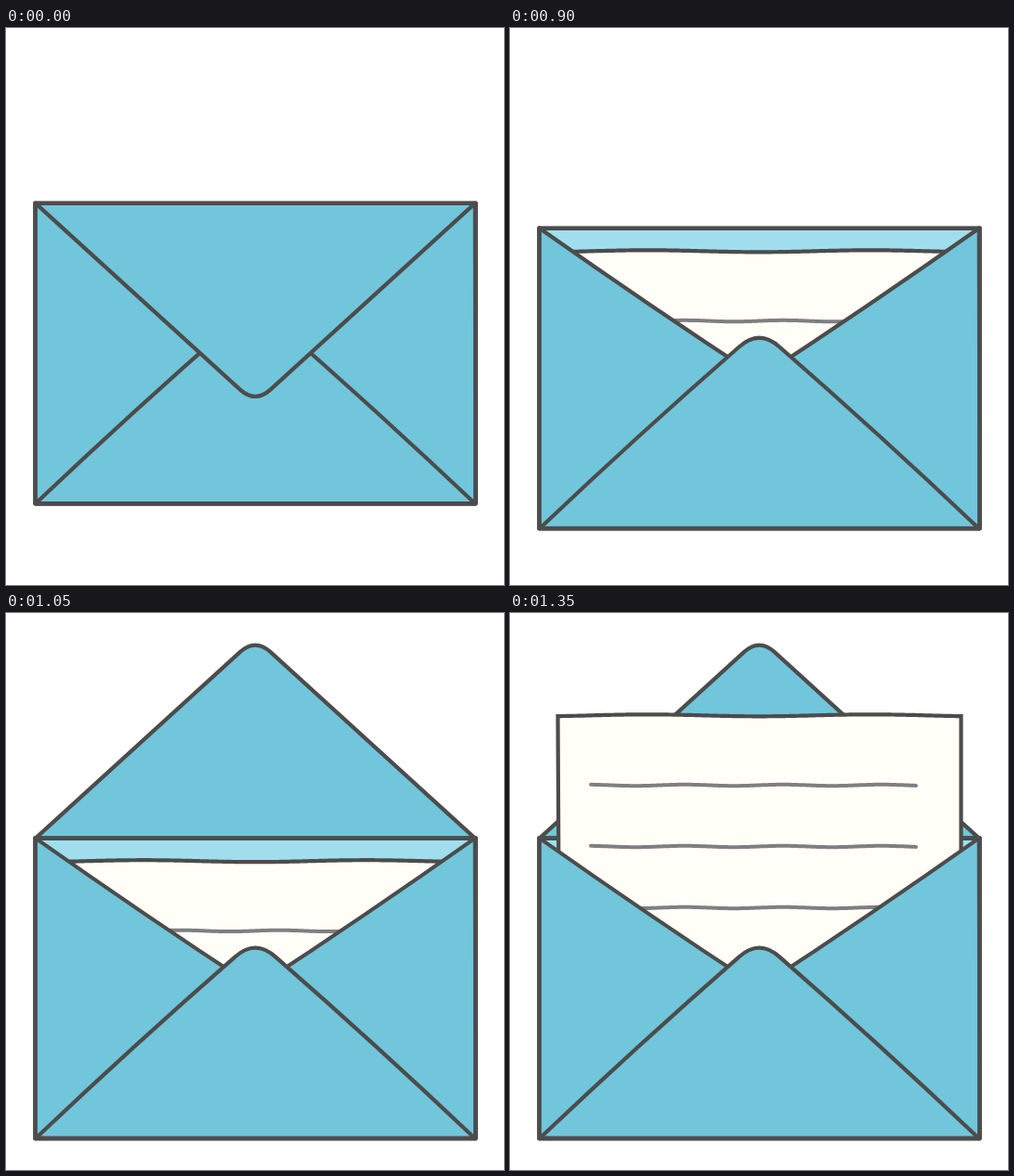
An HTML page with a canvas for the animation above (2.15 s loop, 536 px wide and 600 px high).

```html
<!DOCTYPE html>
<html lang="en">
<head>
<meta charset="utf-8">
<title>Opening envelope</title>
<style>
  html, body { margin: 0; width: 100%; height: 100%; overflow: hidden; background: #fff; }
  canvas { display: block; }
</style>
</head>
<body>
<canvas width="536" height="600"></canvas>
<script>
const ctx = document.querySelector('canvas').getContext('2d');

const BLUE = '#71c6db', INSIDE = '#a0deee', PAPER = '#fffff8';
const INK = '#4c4c4c', GRAY = '#7f7f81';
const LEFT = 31.5, RIGHT = 505.5, MID = 268.3, HALF = 236.5, HEIGHT = 323.4;
const LOOP = 2150, HOLD = 800, STEP = 50, STEPS = 12, OPEN = 6;

function fill(color) {
  ctx.fillStyle = color;
  ctx.fill();
}

function stroke(color = INK, width = 4.2) {
  ctx.strokeStyle = color;
  ctx.lineWidth = width;
  ctx.stroke();
}

// Symmetric triangle sides from both corners to the apex:
// "round" is half the width of the rounded tip, "bow" how far the sides bend down.
function peak(base, apex, round, bow = 0) {
  const shoulder = apex + (base - apex) * round / HALF;
  const bendX = (HALF + round) / 2;
  const bendY = (base + shoulder) / 2 + 2 * bow;
  ctx.beginPath();
  ctx.moveTo(MID - HALF, base);
  ctx.quadraticCurveTo(MID - bendX, bendY, MID - round, shoulder);
  ctx.quadraticCurveTo(MID, apex, MID + round, shoulder);
  ctx.quadraticCurveTo(MID + bendX, bendY, MID + HALF, base);
}

// Slightly wavy horizontal line, lowest at x = low.
function wave(x0, x1, y, size, period, low) {
  ctx.beginPath();
  for (let x = x0; x <= x1; x += 2) {
    ctx.lineTo(x, y + size * Math.cos((x - low) * 2 * Math.PI / period));
  }
}

function drawFlap(top, scale) {
  peak(top, top + 215.5 * scale, 16.5);
  ctx.closePath();
  fill(BLUE);
  stroke();
}

function drawLetter(y) {
  ctx.lineJoin = 'miter';
  wave(51.5, 485.5, y, 1, 240, MID);
  ctx.lineTo(485.5, y + 285);
  ctx.lineTo(53, y + 285);
  ctx.closePath();
  fill(PAPER);
  stroke();
  ctx.lineJoin = 'round';
  for (let row = 0; row < 3; row++) {
    wave(87, 437, y + 75.2 + 66 * row, 0.7, 106, 135);
    stroke(GRAY, 4);
  }
}

function drawFront(top) {
  const bottom = top + HEIGHT;
  peak(top, top + 161, 0, 1.5);
  ctx.lineTo(RIGHT, bottom);
  ctx.lineTo(LEFT, bottom);
  fill(BLUE);
  stroke();

  peak(bottom, top + 108, 22, -2);
  fill(BLUE);
  stroke();

  ctx.beginPath();
  ctx.moveTo(LEFT, top);
  ctx.lineTo(LEFT, bottom);
  ctx.lineTo(RIGHT, bottom);
  ctx.lineTo(RIGHT, top);
  stroke(INK, 4.8);
}

function draw(step) {
  const lift = Math.min(step, OPEN);
  const top = 188.9 + 8.95 * lift;
  const scale = 1 - lift / 3;
  const rise = 26.15 * (step - lift);

  ctx.clearRect(0, 0, 536, 600);
  ctx.lineCap = ctx.lineJoin = 'round';
  ctx.fillStyle = INSIDE;
  ctx.fillRect(LEFT, top, RIGHT - LEFT, HEIGHT);
  if (scale <= 0) drawFlap(top, scale);
  ctx.beginPath();
  ctx.moveTo(LEFT, top);
  ctx.lineTo(RIGHT, top);
  stroke(INK, 4.6);
  drawLetter(top + 24.6 - rise);
  drawFront(top);
  if (scale > 0) drawFlap(top, scale);
}

const start = performance.now();
function tick() {
  const t = (performance.now() - start) % LOOP;
  draw(t < HOLD ? 0 : Math.min(STEPS, Math.floor((t - HOLD) / STEP) + 1));
  requestAnimationFrame(tick);
}
tick();
</script>
</body>
</html>
```
